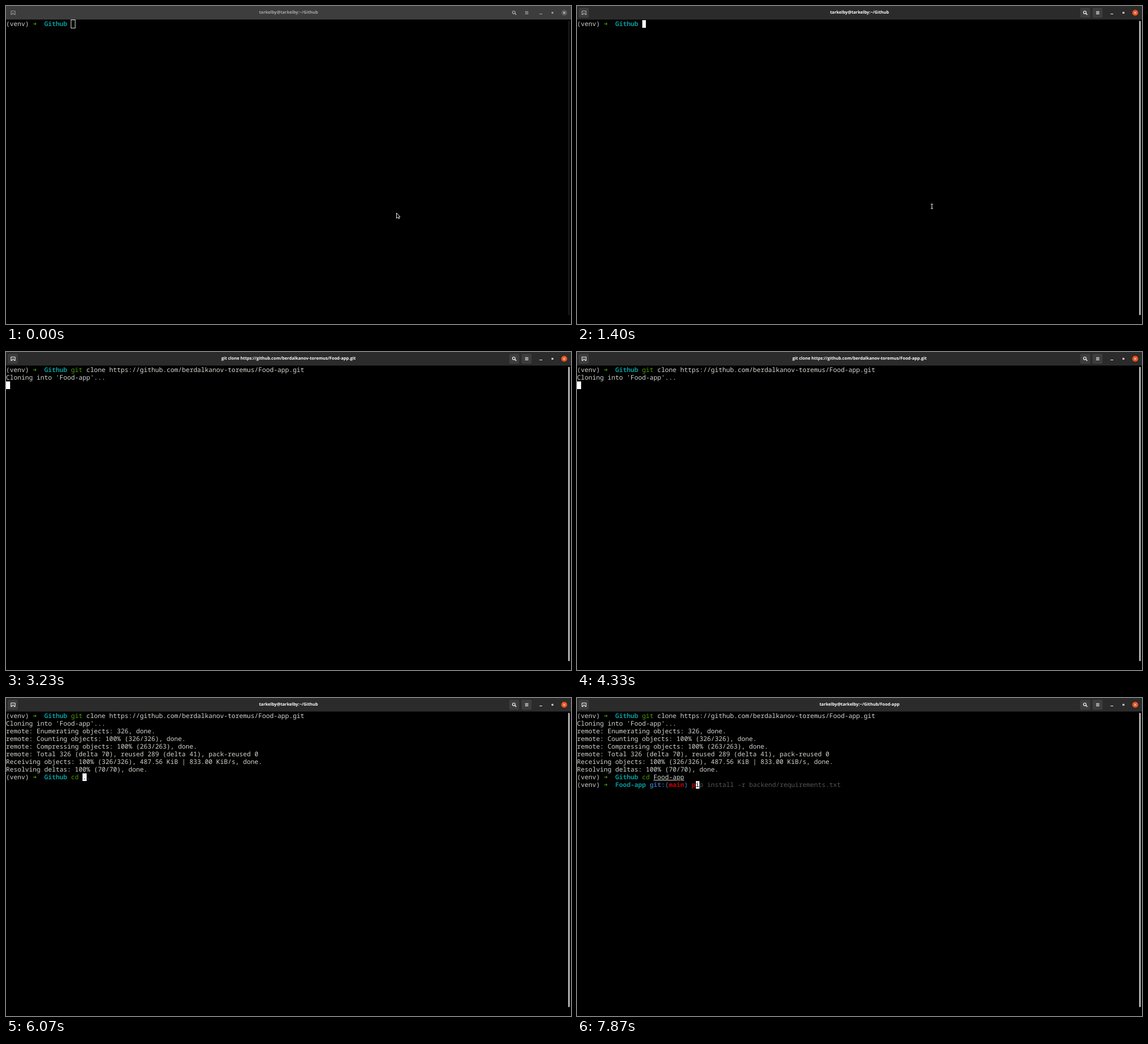
Animation, 960 px wide and 540 px high, one loop 8000 ms. Source, as an HTML page:

```html
<!DOCTYPE html>
<html lang="en">
<head>
<meta charset="utf-8">
<title>Terminal</title>
<style>
  html, body { margin: 0; width: 100%; height: 100%; overflow: hidden; background: #000; }
  #stage { position: absolute; left: 0; top: 0; width: 960px; height: 540px; overflow: hidden; background: #000; }
  #stage svg { position: absolute; left: 0; top: 0; }
  #bar { position: absolute; left: 0; top: 0; width: 960px; height: 23px; background: #3d3d3d; }
  #title {
    position: absolute; left: 0; top: 0; width: 960px; text-align: center; color: #a9a9a9;
    font: 700 7.2px/23px "Open Sans", "Noto Sans", sans-serif; text-rendering: geometricPrecision;
  }
  #bar svg { color: #a9a9a9; }
  .box { fill: none; }
  .close { fill: #5a5a5a; }
  .focus #bar { background: #2b2b2b; }
  .focus #title { color: #fff; }
  .focus #bar svg { color: #f0f0f0; }
  .focus .box { fill: #3d3d3d; }
  .focus .close { fill: #e95420; }
  #scroll { position: absolute; left: 955px; top: 25px; width: 3px; height: 500px; border-radius: 2px; background: #161616; }
  .focus #scroll { background: #acacac; }
  #text, #cursor {
    position: absolute; margin: 0; white-space: pre; color: #d3d7cf;
    font: 10.8333px/13px "Noto Sans Mono", "DejaVu Sans Mono", monospace;
    font-variant-ligatures: none; text-rendering: geometricPrecision;
  }
  #text { left: 0; top: 24px; }
  #text div { height: 13px; }
  #cursor { width: 6.5px; height: 13px; background: #fff; color: #000; }
  #cursor.hollow { background: none; box-sizing: border-box; width: 8px; height: 15px; margin: -1px 0 0 -.5px; border: 1px solid #d3d7cf; }
  .arrow { display: inline-block; width: 6.5px; height: 13px; vertical-align: top; color: #4e9a06; font-family: "DejaVu Sans Mono", monospace; font-weight: 700; }
  .dir { color: #06989a; font-weight: 700; }
  .ok { color: #4e9a06; }
  .bad { color: #cc0000; font-weight: 700; }
  .hint { color: #555753; }
  .path { text-decoration: underline; }
  .git { color: #3465a4; font-weight: 700; }
  .branch { color: #cc0000; font-weight: 700; }
</style>
</head>
<body>
<div id="stage">
  <div id="bar">
    <svg width="960" height="23" fill="none" stroke="currentColor">
      <g class="box" stroke="none">
        <rect x="3" y="3" width="17" height="17" rx="2"/>
        <rect x="855" y="3" width="17" height="17" rx="2"/>
        <rect x="876" y="3" width="17" height="17" rx="2"/>
      </g>
      <path id="tab" d="M8.5 15V8.5H15.5V15M10.5 14.5V12H13.5V14.5M8 14.5H10.5M13.5 14.5H16"/>
      <circle cx="862.8" cy="10.8" r="2.3" stroke-width="1.2"/>
      <path d="M864.6 12.6L867 15" stroke-width="1.4"/>
      <path d="M882 9.5H887.5M882 11.5H887.5M882 13.5H887.5"/>
      <path d="M906.5 13.5H911"/>
      <rect x="927.5" y="10.5" width="2" height="2"/>
      <circle class="close" cx="948.5" cy="11.5" r="5" stroke="none"/>
      <path d="M946.8 9.8L950.2 13.2M950.2 9.8L946.8 13.2" stroke="#fff"/>
    </svg>
    <div id="title"></div>
  </div>
  <div id="scroll"></div>
  <div id="text"></div>
  <div id="cursor"></div>
  <svg width="960" height="540">
    <g id="mouse">
      <path id="pointer" d="M-1.5 -3.5V5.5L.7 3.6L2.2 6.4L3.6 5.7L2.2 3H4.6Z" fill="#000" stroke="#e6e6e6"/>
      <path id="beam" d="M-2 -3.5H-.5L0 -3L.5 -3.5H2M0 -3V3.5M-2 4H-.5L0 3.5L.5 4H2" fill="none" stroke="#d8d8d8" stroke-width="1.2"/>
    </g>
  </svg>
</div>
<script>
const LOOP = 8000, CELL = 6.5, ROW = 13;
const $ = id => document.getElementById(id);
const HOST = 'tarkelby@tarkelby:~/Github';
const CLONE = 'git clone https://github.com/berdalkanov-toremus/Food-app.git';
const PIP = 'pip install -r backend/requirements.txt';

// [time, typed characters, line with its suggestion]
const cloneKeys = [[2200, 1, CLONE], [2330, 2, CLONE], [2430, 3, CLONE], [2570, 4, CLONE], [2970, CLONE.length, CLONE]];
const cdKeys = [[5670, 1, 'cd ..'], [5770, 2, 'cd ..'], [5900, 3, 'cd ..'], [6100, 4, 'cd Food-app'], [6330, 11, 'cd Food-app']];
const pipKeys = [[7670, 1, PIP]];

const titles = [[0, HOST], [3170, CLONE], [5370, HOST], [6700, HOST + '/Food-app']];
const cursorOff = [[2000, 2200], [3730, 4330], [4930, 5530], [7130, 7670]];

const at = (steps, t) => steps.filter(s => s[0] <= t).pop();
const ramp = (t, a, b) => Math.min(1, Math.max(0, (t - a) / (b - a)));
const span = (cls, s) => s && `<span class="${cls}">${s}</span>`;

function prompt(dir, git = '') {
  return { html: '(venv) ' + span('arrow', '➜') + '  ' + span('dir', dir) + ' ' + git, cols: 11 + dir.length };
}

function input(p, keys, t) {
  const key = at(keys, t);
  if (!key) return p;
  const [, n, full] = key;
  const word = full.split(' ')[0].length;
  const args = full.slice(word, n);
  const shown = full.startsWith('cd') && n > 3 ? ' ' + span('path', args.trim()) : args;
  return {
    html: p.html + span(n < word ? 'bad' : 'ok', full.slice(0, Math.min(n, word))) + shown + span('hint', full.slice(n)),
    cols: p.cols + n,
    under: full[n]
  };
}

function progress(label, total, t, a, b, tail = ', done.') {
  const pct = Math.floor(ramp(t, a, b) * 100 + 1e-6);
  const done = Math.ceil(total * pct / 100);
  return `${label}: ${String(pct).padStart(3)}% (${done}/${total})${pct === 100 ? tail : ''}`;
}

function screen(t) {
  const rows = [];
  let cur;
  const put = p => {
    rows.push(p.html);
    cur = { row: rows.length - 1, col: p.cols, ch: p.under || '' };
  };
  const out = s => {
    rows.push(s);
    cur = { row: rows.length - 1, col: 0, ch: s[0] };
  };
  const newline = () => { cur = { row: rows.length, col: 0, ch: '' }; };

  put(input(prompt('Github'), cloneKeys, t));
  if (t >= 3130) newline();
  if (t >= 3200) { out("Cloning into 'Food-app'..."); newline(); }
  if (t >= 4350) out('remote: Enumerating objects: 326, done.');
  if (t >= 4400) out(progress('remote: Counting objects', 326, t, 4400, 4600));
  if (t >= 4600) out(progress('remote: Compressing objects', 263, t, 4600, 4830));
  if (t >= 5150) out('remote: Total 326 (delta 70), reused 289 (delta 41), pack-reused 0');
  if (t >= 4830) out(progress('Receiving objects', 326, t, 4830, 5130, ', 487.56 KiB | 833.00 KiB/s, done.'));
  if (t >= 5200) out(progress('Resolving deltas', 70, t, 5200, 5340));
  if (t >= 5370) put(input(prompt('Github'), cdKeys, t));
  if (t >= 6530) newline();
  if (t >= 6700) {
    const p = prompt('Food-app', span('git', 'git:(') + span('branch', 'main') + span('git', ')') + ' ');
    p.cols += 11;
    put(input(p, pipKeys, t));
  }
  return { rows, cur };
}

let last = '';
function draw(t) {
  const { rows, cur } = screen(t);
  const html = rows.map(r => `<div>${r}</div>`).join('');
  if (html !== last) $('text').innerHTML = last = html;

  const focus = t >= 1400;
  $('stage').className = focus ? 'focus' : '';
  $('title').textContent = at(titles, t)[1];
  $('tab').style.opacity = focus ? .6 + .4 * ramp(t, 1400, 1600) : .8;

  const c = $('cursor');
  c.className = focus ? '' : 'hollow';
  c.style.left = cur.col * CELL + 'px';
  c.style.top = 24 + cur.row * ROW + 'px';
  c.style.visibility = cursorOff.some(([a, b]) => t >= a && t < b) ? 'hidden' : 'visible';
  c.textContent = cur.ch;

  const u = ramp(t, 30, 700), e = u * u * (3 - 2 * u);
  $('mouse').setAttribute('transform', `translate(${665 - 62 * e} ${355 - 15 * e})`);
  $('mouse').style.display = t < 2200 ? '' : 'none';
  $('pointer').style.display = t < 60 ? '' : 'none';
  $('beam').style.display = t < 60 ? 'none' : '';
}

function tick() {
  draw(performance.now() % LOOP);
  requestAnimationFrame(tick);
}
tick();
</script>
</body>
</html>
```
